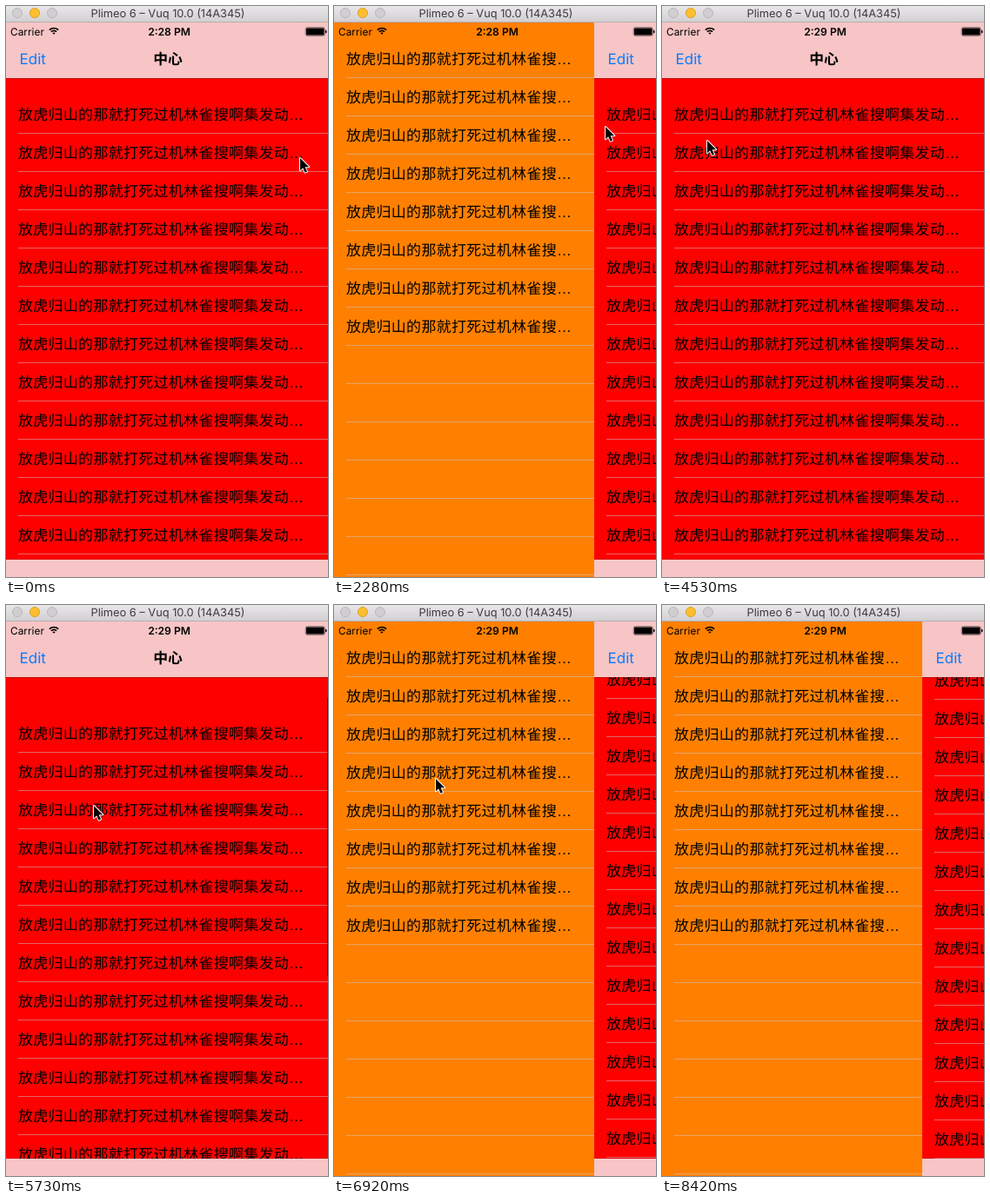
Write an HTML page with a canvas that moves like this. It is 370 px wide and 657 px high and loops after 8520 ms.

```html
<!DOCTYPE html>
<html lang="zh-CN">
<head>
<meta charset="utf-8">
<style>
html, body { margin: 0; width: 370px; height: 657px; overflow: hidden; }
canvas { display: block; }
</style>
</head>
<body>
<canvas id="stage" width="370" height="657"></canvas>
<script>
const ctx = document.getElementById('stage').getContext('2d');
const LOOP = 8520, STEP = 150, ROW = 44, NAV = 83, TAB = 637;
const UI = 'Inter, Roboto, sans-serif';
const CJK = '"Liberation Sans", "Noto Sans CJK SC", "Noto Sans CJK", sans-serif';
const PINK = '#f7c5c5';
const WORDS = '放虎归山的那就打死过机林雀搜啊集发动';

// The picture changes in even steps, counted afresh from each of these times
const anchors = [0, 740, 1040, 1210, 1680, 3930, 5130, 6920];

// Each gesture adds its changes to the state, eased between two times
const rest = { x: 338, y: 175, drawer: 0, main: 0, side: 0 };
const gestures = [
  [0, 740, { x: -320, y: -103 }],
  [950, 1360, { x: 86, y: 36, drawer: 87 }],
  [1530, 2280, { x: 208, y: 31, drawer: 212 }],
  [2880, 3630, { x: -55, y: 9, drawer: -59 }],
  [3780, 4530, { x: -205, y: 7, drawer: -240 }],
  [4980, 5730, { x: 49, y: 76, main: 23 }],
  [5730, 6330, { x: -81, y: -46, main: -62 }],
  [6330, 6920, { x: 97, y: 15, drawer: 299 }],
  [7220, 7520, { x: 30, y: -20, main: 1, side: -13 }],
  [7520, 7970, { x: 60, y: 70, side: 40 }],
  [7970, 8420, { x: 110, y: 25, side: -27 }]
];

function ease(t, from, to) {
  const p = Math.min(Math.max((t - from) / (to - from), 0), 1);
  return p * p * (3 - 2 * p);
}

function stateAt(t) {
  const s = { ...rest };
  for (const [from, to, change] of gestures)
    for (const key in change) s[key] += change[key] * ease(t, from, to);
  for (const key in s) s[key] = Math.round(s[key]);
  return s;
}

function snap(t) {
  const start = anchors.findLast(a => a <= t);
  return start + Math.floor((t - start) / STEP) * STEP;
}

function rect(color, x, y, w, h) {
  ctx.fillStyle = color;
  ctx.fillRect(x, y, w, h);
}

function text(str, x, y, font, color = '#000', align = 'left', spacing = 0) {
  ctx.font = font;
  ctx.letterSpacing = spacing + 'px';
  ctx.textRendering = 'geometricPrecision';
  ctx.fillStyle = color;
  ctx.textAlign = align;
  ctx.fillText(str, x, y);
}

function disc(x, fill, stroke) {
  ctx.beginPath();
  ctx.arc(x, 8, 5.5, 0, 7);
  ctx.fillStyle = fill;
  ctx.fill();
  ctx.lineWidth = 1;
  ctx.strokeStyle = stroke;
  ctx.stroke();
}

function list(top, rows, filled, chars, right) {
  for (let i = 0; i < rows; i++) {
    const y = top + ROW * i;
    if (i < filled) text(WORDS.slice(0, chars) + '…', 14, y + 28, '17px ' + CJK, '#000', 'left', .28);
    rect('rgba(200,199,204,.5)', 14, y + ROW - 1, right - 14, 1);
  }
}

function sidePanel(scroll) {
  rect('#ff8000', 0, 19, 370, 638);
  list(39 + scroll, 15, 8, 14, 299);
}

function mainPanel(x, scroll, scrolling) {
  ctx.save();
  ctx.translate(x, 0);
  rect('#f00', 0, NAV, 370, TAB - NAV);
  list(103 + scroll, 13, 13, 18, 370);
  if (scrolling) {
    const up = Math.max(-scroll, 0), over = Math.max(scroll, 0);
    rect('rgba(0,0,0,.5)', 369, 107 + up * .6, 1, 343 - over);
  }
  rect('rgba(0,0,0,.25)', 0, NAV, 370, 1);
  rect('rgba(0,0,0,.15)', 0, TAB - 1, 370, 1);
  rect(PINK, 0, 19, 370, NAV - 19);
  rect(PINK, 0, TAB, 370, 657 - TAB);
  text('Edit', 15.5, 67, '17px ' + UI, '#087cff');
  text('中心', 186, 67, 'bold 16.8px ' + CJK, '#000', 'center');
  ctx.restore();
}

function statusBar(time) {
  text('Carrier', 5, 33.5, '11.9px ' + UI);
  text(time, 187.5, 33.5, '600 12.1px ' + UI, '#000', 'center');
  ctx.strokeStyle = '#000';
  ctx.lineWidth = 1.7;
  for (let r = 1.4; r < 8; r += 2.95) {
    ctx.beginPath();
    ctx.arc(55, 32.8, r, -Math.PI * .75, -Math.PI * .25);
    ctx.stroke();
  }
  ctx.lineWidth = .5;
  ctx.beginPath();
  ctx.roundRect(344.25, 24.75, 22, 9.5, 2);
  ctx.stroke();
  ctx.beginPath();
  ctx.roundRect(345, 25.5, 20.5, 8, 1);
  ctx.roundRect(367, 27.8, 1.4, 3.5, .7);
  ctx.fillStyle = '#000';
  ctx.fill();
}

function titleBar() {
  const g = ctx.createLinearGradient(0, 0, 0, 18);
  g.addColorStop(0, '#e9e7e9');
  g.addColorStop(1, '#d2d0d2');
  rect(g, 0, 0, 370, 18);
  rect('#b4b0b2', 0, 18, 370, 1);
  disc(13, '#d0ced0', '#b9b7b9');
  disc(33, '#fdbe2f', '#dfa023');
  disc(53, '#d0ced0', '#b9b7b9');
  text('Plimeo 6 – Vuq 10.0 (14A345)', 186, 13, '12.8px ' + UI, '#3c3a3c', 'center');
}

const arrow = new Path2D('M0 0V14.2L3.2 11.2L5.6 16.7L8 15.6L5.6 10.3H10.2Z');

function cursor(x, y) {
  ctx.save();
  ctx.translate(x, y);
  ctx.lineWidth = 2;
  ctx.lineJoin = 'round';
  ctx.strokeStyle = '#fff';
  ctx.stroke(arrow);
  ctx.fillStyle = '#000';
  ctx.fill(arrow);
  ctx.restore();
}

function frame() {
  const t = snap(performance.now() % LOOP);
  const s = stateAt(t);
  sidePanel(s.side);
  mainPanel(s.drawer, s.main, t >= 5130 && t < 6400);
  statusBar(t < 4080 ? '2:28 PM' : '2:29 PM');
  titleBar();
  if (t < 8270) cursor(s.x, s.y);
  requestAnimationFrame(frame);
}
frame();
</script>
</body>
</html>
```
